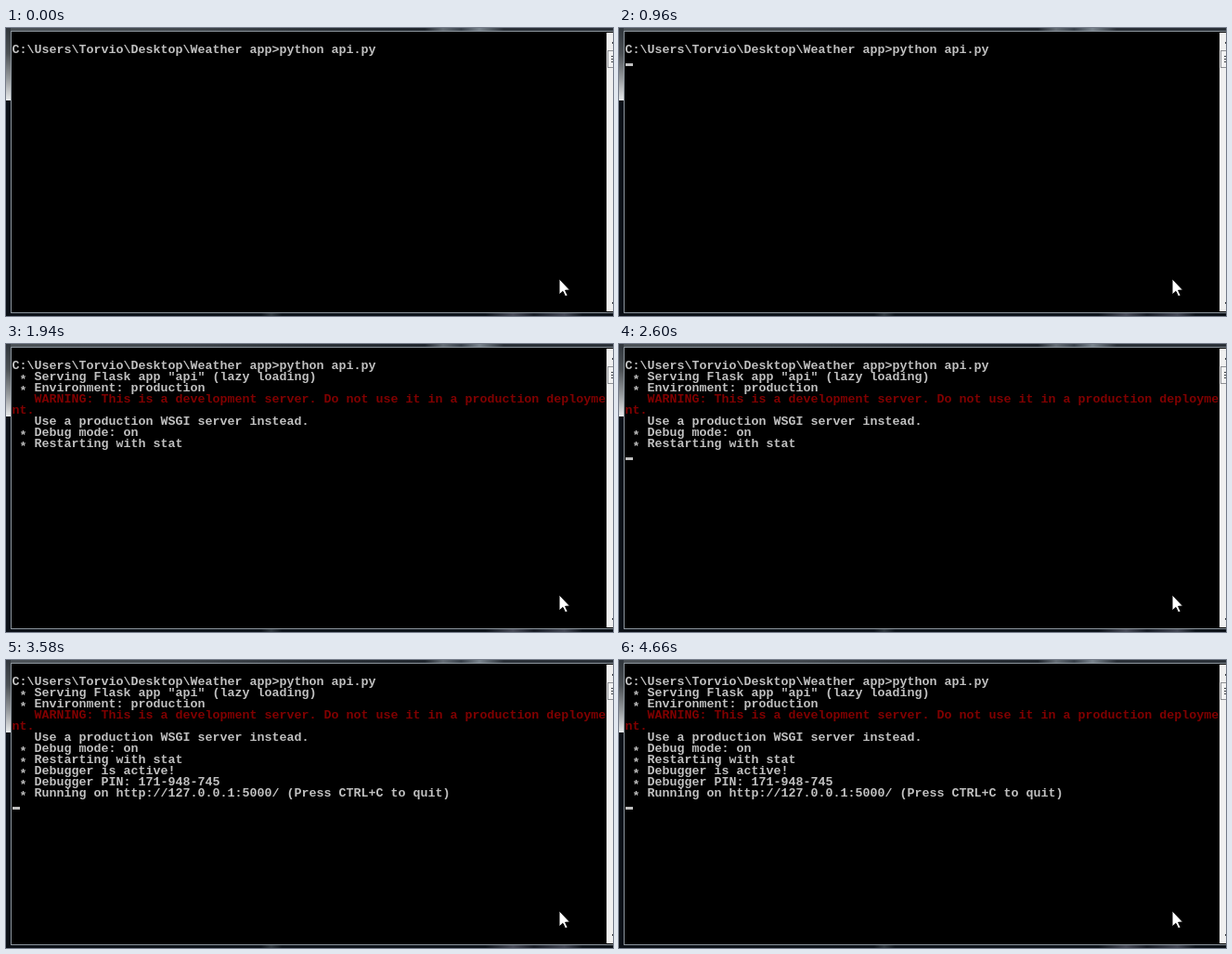
An HTML page with a canvas for the animation above (5090 ms loop, 654 by 310 pixels).

```html
<!DOCTYPE html>
<html lang="en">
<head>
<meta charset="utf-8">
<title>Console</title>
<style>
html, body { margin: 0; width: 654px; height: 310px; overflow: hidden; background: #000; }
canvas { display: block; }
</style>
</head>
<body>
<canvas id="stage" width="654" height="310"></canvas>
<script>
const ctx = document.getElementById("stage").getContext("2d");
const LOOP = 5090, LEFT = 7, CELL = 8, ROW = 12, BASE = 27;
const GREY = "#c0c0c0", RED = "#800000";

// [appears at ms, text, colour]
const lines = [
  [0, "C:\\Users\\Torvio\\Desktop\\Weather app>python api.py"],
  [1510, ' * Serving Flask app "api" (lazy loading)'],
  [1510, " * Environment: production"],
  [1510, "   WARNING: This is a development server. Do not use it in a production deployme", RED],
  [1510, "nt.", RED],
  [1510, "   Use a production WSGI server instead."],
  [1510, " * Debug mode: on"],
  [1940, " * Restarting with stat"],
  [3030, " * Debugger is active!"],
  [3030, " * Debugger PIN: 171-948-745"],
  [3030, " * Running on http://127.0.0.1:5000/ (Press CTRL+C to quit)"]
];

// [from ms, to ms, column, row]
const carets = [
  [430, 960, 49, 0],
  [960, 1510, 0, 1],
  [2600, 3030, 0, 8],
  [3580, 4110, 0, 11],
  [4660, 5090, 0, 11]
];

function rect(x, y, w, h, fill) {
  ctx.fillStyle = fill;
  ctx.fillRect(x, y, w, h);
}

function gradient(x, y, stops) {
  const g = ctx.createLinearGradient(0, 0, x, y);
  for (const [at, color] of stops) g.addColorStop(at, color);
  return g;
}

function drawFrame() {
  rect(0, 0, 654, 310, "#0c1118");
  rect(0, 0, 654, 3, gradient(654, 0, [
    [0, "#4c5257"], [0.3, "#41474d"], [0.5, "#2c3238"], [0.69, "#20262d"],
    [0.72, "#666e76"], [0.75, "#39414a"], [0.78, "#7b858e"],
    [0.82, "#2a3037"], [1, "#2a3037"]
  ]));
  rect(0, 0, 5, 78, gradient(0, 78, [
    [0, "#30363c"], [0.35, "#4b5054"], [0.7, "#979b9e"], [1, "#e8eaeb"]
  ]));
  rect(0, 307, 654, 3, gradient(654, 0, [
    [0, "#0b1017"], [0.42, "#0e141b"], [0.437, "#30383f"], [0.455, "#0e141b"],
    [0.79, "#0e141b"], [0.835, "#4a4d5a"], [0.87, "#171c25"],
    [0.92, "#454956"], [0.95, "#0e141b"], [1, "#0b1017"]
  ]));
  rect(5, 3, 649, 304, "#8b949c");
  rect(6, 4, 648, 302, "#000");
}

function drawScrollbar() {
  rect(647, 5, 7, 300, "#f0f0f0");
  rect(648, 24, 6, 19, "#8e9094");
  rect(649, 25, 5, 17, "#f4f4f4");
  for (let y = 30; y < 37; y += 3) rect(652, y, 2, 1, "#404449");
  rect(653, 15, 1, 2, "#404449");
  rect(653, 295, 1, 2, "#404449");
}

function drawText(t) {
  ctx.font = "bold 13.33px 'Liberation Mono', monospace";
  lines.forEach(([start, text, color = GREY], row) => {
    if (t < start) return;
    const x = LEFT - 0.5, y = BASE + row * ROW;
    ctx.fillStyle = color;
    // bullets sit at mid height
    if (text.startsWith(" *")) ctx.fillText("*", x + CELL, y + 3);
    ctx.fillText(text.replace("*", " "), x, y);
  });
  for (const [from, to, col, row] of carets) {
    if (t >= from && t < to) rect(LEFT + col * CELL, 26 + row * ROW, CELL, 3, GREY);
  }
}

function drawPointer() {
  const points = [[596, 270], [596, 287], [600, 283.5], [602.6, 289],
                  [605.2, 288], [602.6, 282.4], [607.5, 282]];
  ctx.beginPath();
  points.forEach(([x, y]) => ctx.lineTo(x, y));
  ctx.closePath();
  ctx.fillStyle = "#fff";
  ctx.fill();
  ctx.strokeStyle = "#000";
  ctx.lineWidth = 1;
  ctx.stroke();
}

function draw(t) {
  drawFrame();
  drawScrollbar();
  drawText(t);
  drawPointer();
}

const begin = performance.now();
function tick() {
  draw((performance.now() - begin) % LOOP);
  requestAnimationFrame(tick);
}
tick();
</script>
</body>
</html>
```
